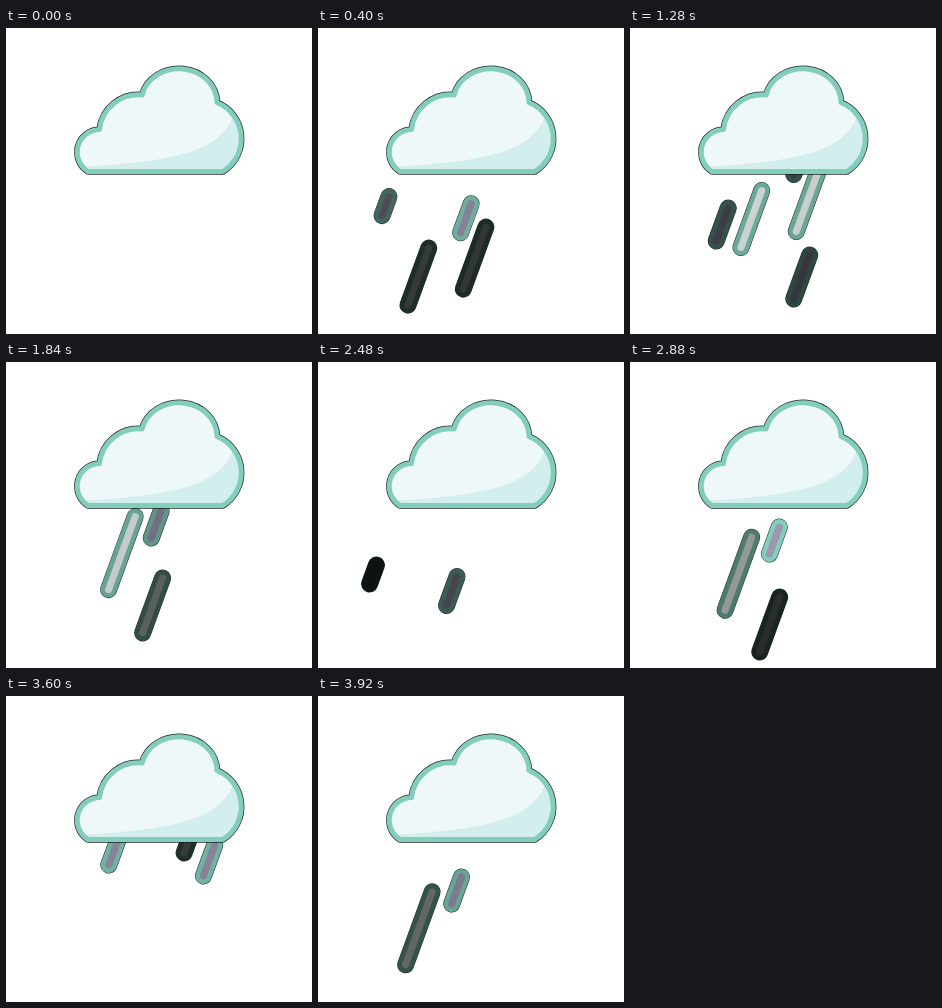
Animation, 306 px wide and 306 px high, one loop 4 s. Source, as an HTML page with a canvas:

```html
<!DOCTYPE html>
<html lang="en">
<head>
<meta charset="utf-8">
<title>Rain cloud</title>
<style>
  html, body { margin: 0; width: 100%; height: 100%; overflow: hidden; background: #fff; }
  canvas { display: block; width: 306px; height: 306px; }
</style>
</head>
<body>
<canvas id="stage" width="306" height="306"></canvas>
<script>
const ctx = document.getElementById('stage').getContext('2d');
const STEP = 80, LOOP = 4000, CYCLE = 1000;
const FADE_IN = 150, FADE_OUT = 200;
const SLANT = 0.364, BASE = 146;
const TEAL = [130, 205, 187], WHITE = [246, 254, 252], MAUVE = [156, 152, 176];
const FRINGE = 'rgba(16, 24, 24, 0.9)';

// lane: x at the cloud's base; tip: lower end's y at time `at`; len is vertical
const drops = [
  { lane: 110.6, len: 33, tip: 213, at: 280, speed: 0.41, end: 360 },
  { lane: 209.2, len: 44, tip: 271, at: 280, speed: 0.44, end: 350 },
  { lane: 164, len: 29, tip: 146.5, at: 280, speed: 0.485, end: 570 },
  { lane: 137.7, len: 57, tip: 219.5, at: 280, speed: 0.48, end: 445 },
  { lane: 187.2, len: 62, tip: 203.5, at: 280, speed: 0.48, end: 442 },
  { lane: 79.2, len: 19, tip: 222, at: 480, speed: 0.43, end: 500 },
  { lane: 111.2, len: 43, tip: 257, at: 800, speed: 0.44, end: 820 },
  { lane: 209.8, len: 31, tip: 261, at: 800, speed: 0.405, end: 820 },
  { lane: 182.1, len: 55, tip: 252, at: 800, speed: 0.475, end: 915 },
  { lane: 156.2, len: 27, tip: 160, at: 800, speed: 0.4, end: 1080 },
  { lane: 132.3, len: 73, tip: 207, at: 800, speed: 0.515, end: 1000 }
];

const cloud = new Path2D(
  'M82 143.5 A22.7 22.7 0 0 1 93.5 101.5 A39 39 0 0 1 136 67 ' +
  'A38 34 0 0 1 211 74.5 A38.9 38.9 0 0 1 217 143.5 Z');
const shade = new Path2D('M76 139 C150 134 214 128 227 88 L245 88 L245 150 L76 150 Z');

const shadeOf = (rgb, light) => `rgb(${rgb.map(v => Math.round(v * light)).join(',')})`;

function strokePath(path, color, width) {
  ctx.strokeStyle = color;
  ctx.lineWidth = width;
  ctx.stroke(path);
}

function drawDrop(drop, time) {
  const left = drop.end - time;
  const age = time - (drop.end - FADE_IN - FADE_OUT);
  const light = Math.min(1, age / FADE_IN, left / FADE_OUT);
  if (light < 0.02) return;
  const bottom = drop.tip + (time - drop.at) * drop.speed;
  const top = bottom - drop.len;
  const xAt = y => drop.lane - SLANT * (y - BASE);
  const line = new Path2D();
  line.moveTo(xAt(top), top);
  line.lineTo(xAt(bottom), bottom);
  strokePath(line, FRINGE, 17);
  strokePath(line, shadeOf(TEAL, light), 16);
  strokePath(line, shadeOf(drop.len > 50 ? WHITE : MAUVE, light), 7);
}

function drawCloud() {
  strokePath(cloud, FRINGE, 6.4);
  ctx.fillStyle = '#eef8f8';
  ctx.fill(cloud);
  ctx.save();
  ctx.clip(cloud);
  ctx.fillStyle = '#d2efee';
  ctx.fill(shade);
  ctx.restore();
  strokePath(cloud, shadeOf(TEAL, 1), 5);
}

function render(time) {
  ctx.fillStyle = '#fff';
  ctx.fillRect(0, 0, 306, 306);
  ctx.lineCap = ctx.lineJoin = 'round';
  ctx.save();
  ctx.beginPath();
  ctx.rect(0, 143, 306, 163);
  ctx.clip();
  drops.forEach(drop => drawDrop(drop, time));
  ctx.restore();
  drawCloud();
}

const start = performance.now();
function tick() {
  const elapsed = (performance.now() - start) % LOOP;
  render(Math.floor(elapsed / STEP) * STEP % CYCLE);
  requestAnimationFrame(tick);
}
tick();
</script>
</body>
</html>
```
